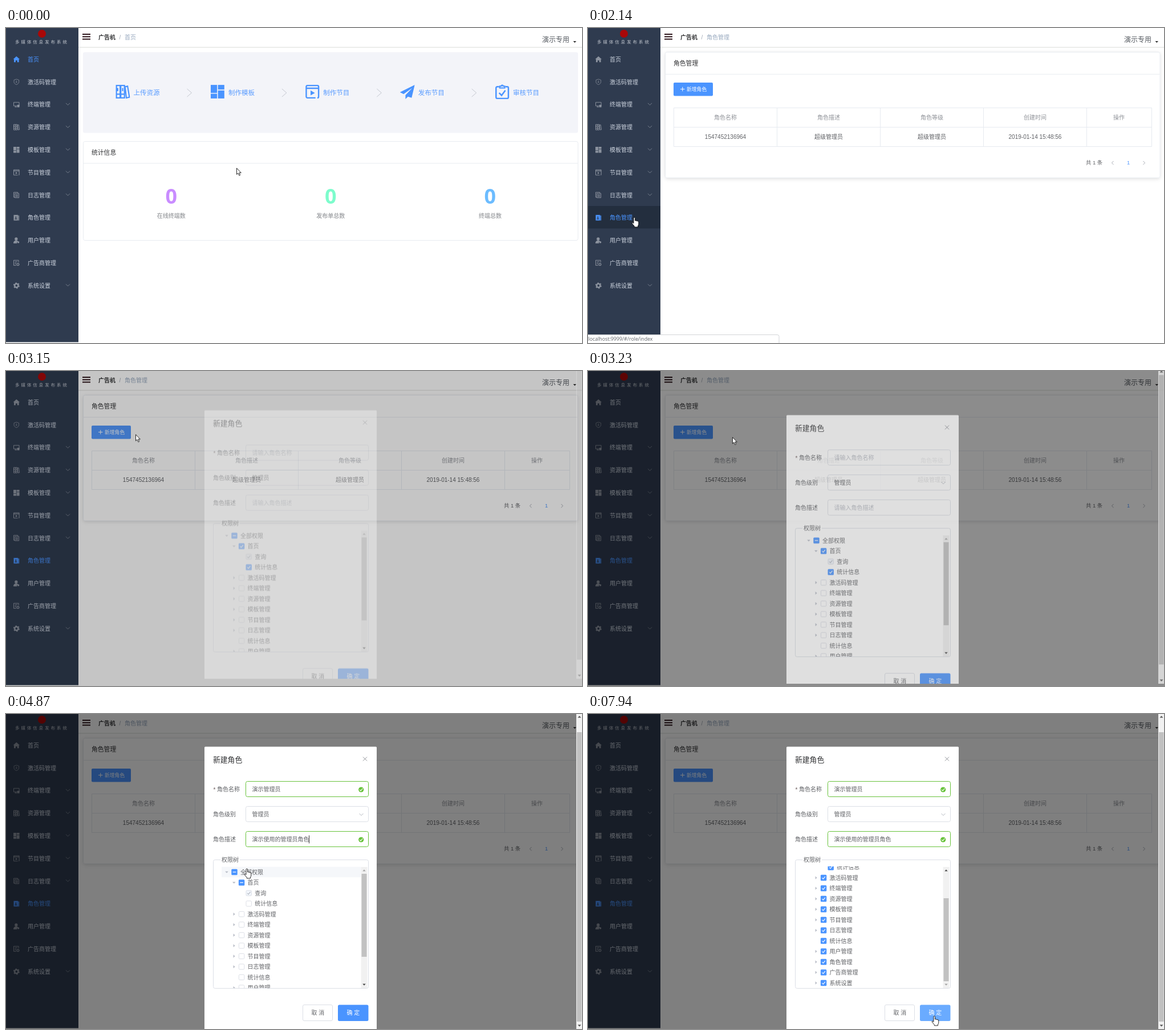
Animation of 1010x554 px, one loop 8000 ms. Source, as an HTML page:

```html
<!DOCTYPE html>
<html lang="zh">
<head>
<meta charset="utf-8">
<title>角色管理</title>
<style>
html, body { margin: 0; width: 100%; height: 100%; overflow: hidden; background: #fff; }
svg { display: block; width: 1010px; height: 554px; }
:root { --run: 8s linear infinite; --step: 8s step-end infinite; }
text { font-family: "Liberation Sans", "Noto Sans CJK SC", "Noto Sans CJK", sans-serif; }
.mid { text-anchor: middle; }

/* 1% = 80 ms */
.home { animation: homeOut var(--run); }
@keyframes homeOut { 0%, 17.125% { opacity: 1 } 19.41%, 100% { opacity: 0 } }
.role { animation: roleIn var(--run); }
@keyframes roleIn { 0%, 19.75% { opacity: 0 } 23.75%, 100% { opacity: 1 } }
.crumbHome { animation: crumbOut var(--run); }
@keyframes crumbOut {
  0%, 17.125% { opacity: 1; transform: none }
  22.84%, 100% { opacity: 0; transform: translateX(20px) }
}
.crumbRole { animation: crumbIn var(--run); }
@keyframes crumbIn {
  0%, 17.125% { opacity: 0; transform: translateX(20px) }
  20.2%, 100% { opacity: 1; transform: none }
}
.bar { animation: bar var(--run); }
@keyframes bar {
  0%, 17.1% { opacity: 0; transform: scaleX(0) }
  17.125% { opacity: .9; transform: scaleX(.2) }
  18.5% { opacity: .9; transform: scaleX(1) }
  21%, 100% { opacity: 0; transform: scaleX(1) }
}
.busy { animation: busy var(--run); }
@keyframes busy { 0%, 17.1% { opacity: 0 } 17.125%, 22% { opacity: 1 } 25%, 100% { opacity: 0 } }
.spin { animation: spin .4s linear infinite; }
@keyframes spin { to { transform: rotate(360deg) } }

.item0 text { animation: textOff var(--run); }
@keyframes textOff { 0%, 17.125% { fill: #4a94ff } 20.8%, 100% { fill: #ccd3de } }
.item0 use { animation: iconOff var(--step); }
@keyframes iconOff { 0% { color: #4a94ff } 17.125%, 100% { color: #8b929e } }
.item7 text { animation: textOn var(--run); }
@keyframes textOn { 0%, 17.125% { fill: #ccd3de } 18.5%, 100% { fill: #4a94ff } }
.item7 use { animation: iconOn var(--step); }
@keyframes iconOn { 0% { color: #8b929e } 17.125%, 100% { color: #4a94ff } }
.itemBg { animation: itemBg var(--run); }
@keyframes itemBg { 0%, 17.1% { opacity: 0 } 17.5%, 28.2% { opacity: 1 } 30%, 100% { opacity: 0 } }
.status { animation: status var(--run); }
@keyframes status { 0%, 12.5% { opacity: 0 } 13.1%, 29% { opacity: 1 } 30%, 100% { opacity: 0 } }
.add { animation: add var(--run); }
@keyframes add {
  0%, 32.2% { fill: #4a94ff } 32.6%, 36.4% { fill: #6aabff }
  36.5%, 38.4% { fill: #62a2ff } 40%, 100% { fill: #4a94ff }
}

.shade { animation: shade var(--run); }
@keyframes shade { 0%, 38.375% { opacity: 0 } 40.6%, 100% { opacity: .5 } }
.wrap { animation: wrapIn var(--run), drop var(--run); }
@keyframes wrapIn { 0%, 38.5% { opacity: 0 } 41.1%, 100% { opacity: 1 } }
@keyframes drop {
  0% { transform: translateY(-20px) }
  38.5% { transform: translateY(-20px); animation-timing-function: ease }
  42.25%, 100% { transform: none }
}
.dialog { animation: pageScroll var(--step); }
@keyframes pageScroll { 0% { transform: translateY(24px) } 60.85%, 100% { transform: none } }
.pageThumb { animation: pageThumb var(--step); }
@keyframes pageThumb { 0% { transform: translateY(-21px) } 60.85%, 100% { transform: none } }
.before { animation: before var(--step); }
@keyframes before { 0% { opacity: 1 } 60.85%, 100% { opacity: 0 } }
.after { animation: after var(--step); }
@keyframes after { 0% { opacity: 0 } 60.85%, 100% { opacity: 1 } }
.focus { animation: focus var(--step); }
@keyframes focus { 0% { opacity: 0 } 51.2% { opacity: 1 } 60.85%, 100% { opacity: 0 } }
.caret1 { animation: caret1 var(--step); }
@keyframes caret1 { 0% { opacity: 0 } 52.1% { opacity: 1 } 56.87%, 100% { opacity: 0 } }
.caret2 { animation: caret2 var(--step); }
@keyframes caret2 { 0% { opacity: 0 } 60.85% { opacity: 1 } 63.37%, 100% { opacity: 0 } }
.some { animation: some var(--step); }
@keyframes some { 0% { opacity: 0 } 60.85% { opacity: 1 } 70.5%, 100% { opacity: 0 } }
.all { animation: all var(--run); }
@keyframes all { 0%, 70.4% { opacity: 0 } 71.5%, 100% { opacity: 1 } }
.hover { animation: hover var(--step); }
@keyframes hover {
  0% { opacity: 0; transform: none }
  60.85% { opacity: 1; transform: none }
  75.7% { opacity: 1; transform: translateY(18.5px) }
  77.25% { opacity: 1; transform: translateY(37px) }
  78.7% { opacity: 1; transform: translateY(55.5px) }
  82.2%, 100% { opacity: 0; transform: translateY(55.5px) }
}
.tree { animation: treeScroll var(--run); }
@keyframes treeScroll {
  0% { transform: none } 82% { transform: none; animation-timing-function: ease }
  84.25%, 100% { transform: translateY(-64px) }
}
.thumb { animation: thumb var(--run); }
@keyframes thumb {
  0% { transform: none } 82% { transform: none; animation-timing-function: ease }
  84.25%, 100% { transform: translateY(43px) }
}
.up { animation: up var(--step); }
@keyframes up { 0% { fill: #a3a3a3 } 82.4%, 100% { fill: #444 } }
.down { animation: down var(--step); }
@keyframes down { 0% { fill: #444 } 84%, 100% { fill: #a3a3a3 } }
.ok { animation: ok var(--run); }
@keyframes ok { 0%, 97.1% { fill: #4a94ff } 98.2%, 100% { fill: #6aabff } }

.cursor { animation: move var(--run); }
@keyframes move {
  0%, .875% { transform: translate(404px, 246px) }
  10.25%, 15.36% { transform: translate(74px, 323px) }
  15.375%, 17.125% { transform: translate(79px, 324px) }
  19.125%, 27.75% { transform: translate(81px, 333px) }
  30% { transform: translate(250px, 210px) }
  31.25% { transform: translate(268px, 130px) }
  32.625%, 38.5% { transform: translate(204px, 107px) }
  40.375% { transform: translate(252.5px, 116px) }
  47.125%, 60.84% { transform: translate(470px, 156px) }
  60.85%, 63.375% { transform: translate(422px, 272px) }
  65.25%, 75% { transform: translate(400px, 278px) }
  78.875%, 82.5% { transform: translate(480px, 326px) }
  84.75%, 85.75% { transform: translate(531px, 359px) }
  87.625%, 90.5% { transform: translate(579px, 424px) }
  93.75% { transform: translate(640px, 480px) }
  96.25% { transform: translate(646px, 505px) }
  99.25%, 100% { transform: translate(607px, 531px) }
}
.arrow { animation: arrow var(--step); }
@keyframes arrow {
  0% { opacity: 1 } 8.75% { opacity: 0 } 28.4% { opacity: 1 } 32.3% { opacity: 0 }
  38.75% { opacity: 1 } 45.6% { opacity: 0 } 93.75% { opacity: 1 } 97.1%, 100% { opacity: 0 }
}
.hand { animation: hand var(--step); }
@keyframes hand {
  0% { opacity: 0 } 8.75% { opacity: 1 } 28.4% { opacity: 0 } 32.3% { opacity: 1 }
  38.75% { opacity: 0 } 60.85% { opacity: 1 } 93.75% { opacity: 0 } 97.1%, 100% { opacity: 1 }
}
.beam { animation: beam var(--step); }
@keyframes beam { 0% { opacity: 0 } 45.6% { opacity: 1 } 60.85%, 100% { opacity: 0 } }
</style>
</head>
<body>
<svg id="stage" viewBox="0 0 1010 554"></svg>
<script>
const BLUE = '#4a94ff', GREEN = '#67c23a', TEXT = '#606266', GREY = '#909399', EDGE = '#dcdfe6';

// y is the vertical middle of the text
const text = (x, y, str, size, fill, more = '') =>
  `<text x="${x}" y="${y + size * .37}" font-size="${size}" fill="${fill}" ${more}>${str}</text>`;
const mid = (x, y, str, size, fill, more = '') => text(x, y, str, size, fill, 'class="mid" ' + more);
const rect = (x, y, w, h, fill, more = '') =>
  `<rect x="${x}" y="${y}" width="${w}" height="${h}" fill="${fill}" ${more}/>`;
const frame = (x, y, w, h, edge, r = 3, fill = 'none') => rect(x, y, w, h, fill, `rx="${r}" stroke="${edge}"`);
const line = (d, stroke, width = 1, more = '') =>
  `<path d="${d}" fill="none" stroke="${stroke}" stroke-width="${width}" ${more}/>`;
const fill = (d, color, more = '') => `<path d="${d}" fill="${color}" ${more}/>`;
const group = (cls, ...parts) => `<g class="${cls}">${parts.join('')}</g>`;
const icon = (name, x, y, size, color) =>
  `<use href="#${name}" x="${x - size / 2}" y="${y - size / 2}" width="${size}" height="${size}" color="${color}"/>`;

const C = 'currentColor';
const icons = {
  home: fill('M12 1L0 12h3v11h6v-7h6v7h6V12h3z', C),
  shield: line('M12 2l9 3v7c0 5-4 8-9 10-5-2-9-5-9-10V5zM12 7v6M9 12l3 3 3-3', C, 1.6),
  screen: line('M2 4h20v13H2zM9 17v4M6 21h8', C, 2) + rect(15, 13, 8, 9, C),
  books: line('M2 2h6v20H2zM9 2h6v20H9zM16 4l4-1 3 18-5 1zM3 16h4M10 16h4M4 6v5M12 6v5', C, 2),
  grid: rect(1, 1, 10.3, 13, C) + rect(12.7, 1, 10.3, 7.5, C) + rect(1, 15.3, 10.3, 7.7, C) + rect(12.7, 10, 10.3, 13, C),
  play: line('M17 22H4a2 2 0 0 1-2-2V4a2 2 0 0 1 2-2h16a2 2 0 0 1 2 2v16a2 2 0 0 1-2 2M2 6.5h20', C, 2.2) + fill('M9 10v8l7-4z', C),
  log: line('M2 2h15v4M2 2v18h4M6 6h15v16H6zM9 11h9M9 14.5h9M9 18h9', C, 2),
  card: fill('M2 2h16v20H2zM19 4h3v18h-3z', C) + '<circle cx="10" cy="10" r="2.5" fill="#2f3b4f"/>' + fill('M6 18c0-6 8-6 8 0z', '#2f3b4f'),
  user: '<circle cx="11" cy="7" r="5.5" fill="currentColor"/>' + fill('M1 23c0-12 14-13 17-7l-4 3v4z', C) + '<circle cx="19" cy="19" r="3.5" fill="currentColor"/>',
  ads: line('M20 10V2H2v19h9M6 7h10M6 12h6M6 16h4', C, 2) + `<circle cx="17.5" cy="17.5" r="4" fill="none" stroke="${C}" stroke-width="2.5"/>`,
  gear: `<circle cx="12" cy="12" r="6.5" fill="none" stroke="${C}" stroke-width="5"/><circle cx="12" cy="12" r="10" fill="none" stroke="${C}" stroke-width="3" stroke-dasharray="5.2 5.27"/>`,
  plane: fill('M24 1L0 13l6 3L20 6 9 17.5V24l4-4 6 2z', C),
  clip: line('M7 4H4a2 2 0 0 0-2 2v15a2 2 0 0 0 2 2h16a2 2 0 0 0 2-2V6a2 2 0 0 0-2-2h-3M7 14l4 4 6-8', C, 2.3) + line('M8 6V3h2.5a1.5 1.5 0 0 1 3 0H16v3z', C, 2)
};
const defs = '<defs>' +
  Object.entries(icons).map(([id, body]) => `<symbol id="${id}" viewBox="0 0 24 24">${body}</symbol>`).join('') +
  `<clipPath id="view">${rect(0, 0, 1010, 554, '#000')}</clipPath>
   <clipPath id="treeView">${rect(364, 268.5, 258.5, 213.5, '#000')}</clipPath>
   <linearGradient id="glow"><stop offset=".75" stop-color="#7fb0f5" stop-opacity="0"/><stop offset="1" stop-color="#7fb0f5"/></linearGradient>
   <filter id="soft" x="-5%" y="-5%" width="110%" height="115%"><feDropShadow dx="0" dy="1.5" stdDeviation="3" flood-opacity=".12"/></filter></defs>`;

const menu = [
  ['home', '首页'], ['shield', '激活码管理'], ['screen', '终端管理', 1], ['books', '资源管理', 1],
  ['grid', '模板管理', 1], ['play', '节目管理', 1], ['log', '日志管理', 1], ['card', '角色管理'],
  ['user', '用户管理'], ['ads', '广告商管理'], ['gear', '系统设置', 1]
];
const sidebar = rect(0, 0, 127, 552.5, '#2f3b4f') +
  rect(0, 313, 127, 39.5, '#232e3e', 'class="itemBg"') +
  '<circle cx="63" cy="10" r="7" fill="#a80808"/>' +
  text(16, 24, '多媒体信息发布系统', 7.4, '#c3c8d0', 'letter-spacing="3.05"') +
  menu.map(([name, label, sub], i) => {
    const y = 55 + 39.8 * i;
    return group('item' + i, icon(name, 18.3, y, 11.5, '#8b929e'), text(38, y, label, 10, '#ccd3de'),
      sub ? line(`M105 ${y - 2.5}l3.5 3.5 3.5-3.5`, '#7d8694', .9) : '');
  }).join('');

const header = rect(134, 10, 14, 2, '#2e161c') + rect(134, 14.3, 14, 2, '#2e161c') + rect(134, 18.6, 14, 2, '#2e161c') +
  text(162, 16, '广告机', 10, '#303133', 'font-weight="700"') +
  text(198.5, 16, '/', 10, '#a0a8b4') +
  group('crumbHome', text(208, 16, '首页', 10, '#97a8be')) +
  group('crumbRole', text(208, 16, '角色管理', 10, '#97a8be')) +
  text(940, 20.6, '演示专用', 12, '#555a60') + fill('M994.5 23h5.5l-2.75 3z', '#333') +
  rect(127, 33.5, 883, 1, '#dadcd8') +
  rect(0, 0, 1006, 1.6, 'url(#glow)', 'class="bar"') +
  `<g transform="translate(997 17)"><g class="busy"><g class="spin">${line('M5.6 -4.2A7 7 0 0 1 -4 5.7', '#4a8fe8', 1.7)}</g></g></g>`;

const steps = [['books', '上传资源'], ['grid', '制作模板'], ['play', '制作节目'], ['plane', '发布节目'], ['clip', '审核节目']];
const totals = [['在线终端数', '#c98cff'], ['发布单总数', '#7dfccc'], ['终端总数', '#6cbcff']];
const home = group('home',
  rect(135, 42.5, 868, 142, '#f3f4f9', 'rx="3"'),
  ...steps.map(([name, label], i) => {
    const x = 204.5 + 166.4 * i;
    return icon(name, x, 112, 26, BLUE) + text(x + 19, 113.5, label, 11.5, '#5a9cff') +
      (i < 4 ? line(`M${x + 113} 107l8 7-8 7`, '#c4c8d0') : '');
  }),
  frame(135.5, 199.5, 867.5, 174, '#e8ebf0'), rect(135.5, 237.5, 867, 1, '#e8ebf0'),
  text(150, 219, '统计信息', 10.8, '#303133'),
  ...totals.map(([label, color], i) => {
    const x = 289.7 + 279.6 * i;
    return `<text class="mid" x="${x}" y="309" font-size="36" font-weight="700" fill="${color}" style="font-family:'Open Sans',sans-serif">0</text>` +
      mid(x, 330, label, 10, '#a9abae', 'font-weight="700"');
  }));

const columns = [
  [241, '角色名称', '1547452136964'], [422, '角色描述', '超级管理员'], [603, '角色等级', '超级管理员'],
  [784, '创建时间', '2019-01-14 15:48:56'], [931, '操作', '']
];
const role = group('role',
  rect(135.5, 42.5, 867.5, 221, '#fff', 'rx="3" stroke="#e8ebf0" filter="url(#soft)"'),
  rect(135.5, 80.8, 867, 1, '#e8ebf0'), text(150, 62, '角色管理', 10.8, '#303133'),
  rect(150, 96, 69, 23.5, BLUE, 'rx="2" class="add"'),
  line('M162 107.5h7.5M165.75 103.75v7.5', '#fff'), text(173, 107.5, '新增角色', 8.8, '#fff'),
  line('M150.5 140.5h838v68h-838zM150.5 174.5h838M331.5 140.5v68M512.5 140.5v68M693.5 140.5v68M874.5 140.5v68', '#e6eaf0'),
  ...columns.map(([x, head, cell]) => mid(x, 157.5, head, 10, GREY) + mid(x, 191.5, cell, 10, TEXT)),
  text(873, 237, '共 1 条', 9.4, TEXT), mid(947.5, 237, '1', 9.4, BLUE),
  line('M921.5 234l-3 3.2 3 3.2M973.5 234l3 3.2-3 3.2', '#a9adb5'));

const status = group('status',
  fill('M-1 555V539.5H332a3 3 0 0 1 3 3V555z', '#fff', 'stroke="#d3d5d8"'),
  text(.5, 547, 'localhost:9999/#/role/index', 8.8, '#5f6368', `style="font-family:'Open Sans',sans-serif"`));

// tree rows: depth, label, leaf
const rows = [[0, '全部权限'], [1, '首页'], [2, '查询', 1], [2, '统计信息', 1],
  ...['激活码', '终端', '资源', '模板', '节目', '日志'].map(s => [1, s + '管理']), [1, '统计信息', 1],
  ...['用户管理', '角色管理', '广告商管理', '系统设置'].map(s => [1, s])];
const rowY = i => 278 + 18.5 * i;
const tick = (x, y, color) => line(`M${x + 2.5} ${y}l2 2.2 3.5-4.4`, color, 1.1);
function box(i, state) {
  const x = 395.3 + 12.6 * rows[i][0], y = rowY(i);
  if (i === 2) return frame(x + .5, y - 4.7, 9.4, 9.4, EDGE, 1.5, '#f2f6fc') + tick(x, y, '#b4b8c0');
  if (state === 'off') return frame(x + .5, y - 4.7, 9.4, 9.4, EDGE, 1.5, '#fff');
  return rect(x, y - 5.2, 10.4, 10.4, BLUE, 'rx="1.5"') +
    (state === 'part' ? rect(x + 2.4, y - .6, 5.6, 1.2, '#fff') : tick(x, y, '#fff'));
}
const boxes = state => rows.map((_, i) => box(i, state(i))).join('');
const fold = ([depth, , leaf], i) => {
  const x = 387 + 12.8 * depth, y = rowY(i);
  return leaf ? '' : fill(i < 2 ? `M${x - 2.8} ${y - 1.2}h5.6l-2.8 3z` : `M${x - 1.2} ${y - 2.8}v5.6l3-2.8z`, '#b8bcc6');
};
const tree = '<g clip-path="url(#treeView)">' + group('tree',
  rect(378, 268.7, 244.5, 18.5, '#f5f7fa', 'class="hover"'),
  ...rows.map((r, i) => fold(r, i) + text(411 + 12.6 * r[0], rowY(i), r[1], 10, TEXT)),
  group('before', boxes(i => i === 0 ? 'part' : i < 4 ? 'on' : 'off')),
  group('some', boxes(i => i < 2 ? 'part' : 'off')),
  group('all', boxes(() => 'on'))) + '</g>' +
  rect(622.5, 269, 11, 213, '#f1f1f1') + rect(623.5, 281, 9, 146, '#c1c1c1', 'class="thumb"') +
  fill('M625.3 276.5h5.4l-2.7-3z', '#a3a3a3', 'class="up"') +
  fill('M625.3 474.5h5.4l-2.7 3z', '#444', 'class="down"');

const field = (y, edge) => frame(420.5, y, 215, 27, edge, 3, '#fff');
const valid = (y, value) => field(y - 14, GREEN) + text(431.5, y, value, 10, TEXT) +
  `<circle cx="622.7" cy="${y + .5}" r="4.6" fill="${GREEN}"/>` + tick(617.5, y + .5, '#fff');
const dialog = group('dialog',
  rect(348, 57.5, 302, 500, '#fff', 'rx="1.5"'),
  text(363, 80.5, '新建角色', 12.8, '#303133'),
  line('M626 75.5l7 7M633 75.5l-7 7', GREY),
  text(363.5, 133.5, '*', 10, '#6b5a5a'), text(370, 132.5, '角色名称', 10, TEXT),
  text(363, 176.5, '角色级别', 10, TEXT), text(363, 220.5, '角色描述', 10, TEXT),
  field(162.5, EDGE), text(431.5, 176.5, '管理员', 10, TEXT), line('M619.5 175l3.5 3.5 3.5-3.5', '#b4b8c0'),
  group('before', field(118.5, EDGE), field(206.5, EDGE),
    text(431.5, 132.5, '请输入角色名称', 10, '#b8bcc4'), text(431.5, 220.5, '请输入角色描述', 10, '#b8bcc4')),
  group('focus', frame(420.5, 118.5, 215, 27, BLUE)),
  group('after', valid(132.5, '演示管理员'), valid(220.5, '演示使用的管理员角色')),
  rect(431, 125, 1, 14, '#333', 'class="caret1"'), rect(531, 213.5, 1, 14, '#333', 'class="caret2"'),
  frame(363.5, 256.5, 272, 226, EDGE), rect(376, 254, 34, 5, '#fff'), text(378, 256, '权限树', 10, TEXT),
  tree,
  frame(520.5, 511.5, 52, 28, EDGE, 2.5, '#fff'), mid(546.8, 525.5, '取 消', 10, TEXT),
  rect(582, 511.5, 53.5, 28.5, BLUE, 'rx="2.5" class="ok"'), mid(608.8, 525.5, '确 定', 10, '#fff', 'font-weight="500"'));

const popup = rect(0, 0, 1010, 554, '#000', 'class="shade"') +
  `<g class="wrap" clip-path="url(#view)">${dialog}` +
  rect(1000, 0, 10, 554, '#f1f1f1') + rect(1001, 32, 8.5, 509, '#c1c1c1', 'class="pageThumb"') +
  fill('M1002.5 6.5h6l-3-3.3z', '#555') + fill('M1002.5 546.5h6l-3 3.3z', '#555') + '</g>';

const cursor = group('cursor',
  group('arrow', fill('M.5 .5V11.5L3 9.3 4.9 13.5 6.7 12.7 4.9 8.7H8.3z', '#fff', 'stroke="#111" stroke-width=".9"')),
  group('hand', fill('M-1 1.5a1.3 1.3 0 0 1 2.6 0V6q1-.8 2.2.3 1.2-.6 2.2.5 1.7-.3 1.8 1.2V12q-.3 2-1.3 3v2H.3V15.5L-3.5 11q-1-1.8.5-2.2L-1 10.5z', '#fff', 'stroke="#111" stroke-width=".9" stroke-linejoin="round"')),
  group('beam', line('M-2.5 -6H-.5L0 -5.5 .5 -6H2.5M0 -5.5V5.5M-2.5 6H-.5L0 5.5 .5 6H2.5', '#222')));

document.getElementById('stage').innerHTML = defs + home + role + header + sidebar + status + popup + cursor;
</script>
</body>
</html>
```
